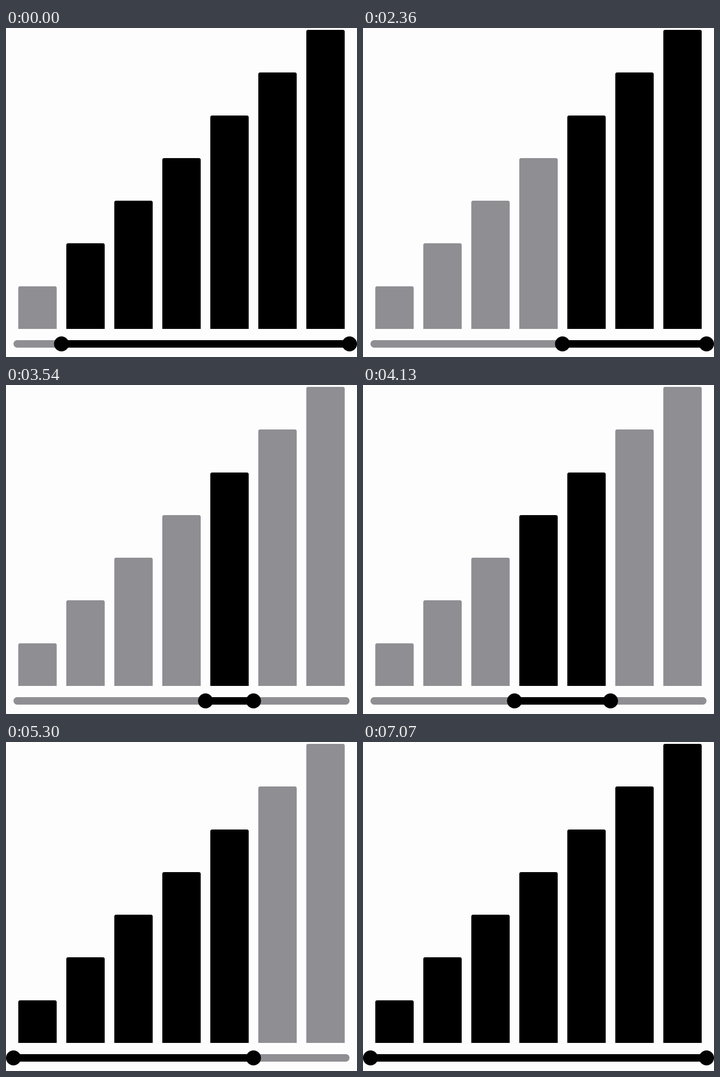
An HTML page for the animation above (7.66 s loop, 750 by 703 pixels).

```html
<!DOCTYPE html>
<html lang="en">
<head>
<meta charset="utf-8">
<title>Range slider histogram</title>
<style>
  html, body { margin: 0; width: 100%; height: 100%; overflow: hidden; background: #fdfdfd; }
  svg { display: block; width: 100%; height: 100%; }
</style>
</head>
<body>
<svg id="stage" viewBox="0 0 750 703"></svg>
<script>
const LOOP = 7660, STEP = 590, SHORT_END = 4710;
const ON = '#000', OFF = '#8e8e93';
const LEFT = 16, WIDTH = 718, COUNT = 7, SLOT = WIDTH / COUNT;
const BASE = 643, UNIT = 639 / COUNT, MID = 675;

// Selected range [low, high] at each step of the drag
const ranges = [
  [1, 7], [2, 7], [3, 7], [4, 7], [4, 7], [4, 6], [4, 5],
  [3, 5], [2, 5], [0, 5], [0, 6], [0, 7], [0, 7]
];

const stage = document.getElementById('stage');

function add(tag, attrs) {
  const el = document.createElementNS('http://www.w3.org/2000/svg', tag);
  for (const key in attrs) el.setAttribute(key, attrs[key]);
  return stage.appendChild(el);
}

function barPath(i) {
  const x = LEFT + SLOT * (i + 0.1), w = SLOT * 0.8, r = 4;
  const top = Math.round(BASE - UNIT * (i + 1));
  return `M${x} ${BASE}V${top + r}a${r} ${r} 0 0 1 ${r} ${-r}h${w - 2 * r}a${r} ${r} 0 0 1 ${r} ${r}V${BASE}z`;
}

const bars = Array.from({ length: COUNT }, (_, i) => add('path', { d: barPath(i) }));
add('rect', { x: LEFT, y: MID - 8, width: WIDTH, height: 16, rx: 8, fill: OFF });
const span = add('rect', { y: MID - 8, height: 16, fill: ON });
const thumbs = [0, 1].map(() => add('circle', { cy: MID, r: 16, fill: ON }));

function draw(t) {
  // One step is 10 ms shorter than the others
  const step = Math.floor((t >= SHORT_END ? t + 10 : t) / STEP);
  const range = ranges[Math.min(step, ranges.length - 1)];
  const [low, high] = range;
  bars.forEach((bar, i) => bar.setAttribute('fill', i >= low && i < high ? ON : OFF));
  span.setAttribute('x', LEFT + low * SLOT);
  span.setAttribute('width', (high - low) * SLOT);
  thumbs.forEach((thumb, i) => thumb.setAttribute('cx', LEFT + range[i] * SLOT));
}

const start = performance.now();
function tick() {
  draw((performance.now() - start) % LOOP);
  requestAnimationFrame(tick);
}
tick();
</script>
</body>
</html>
```
